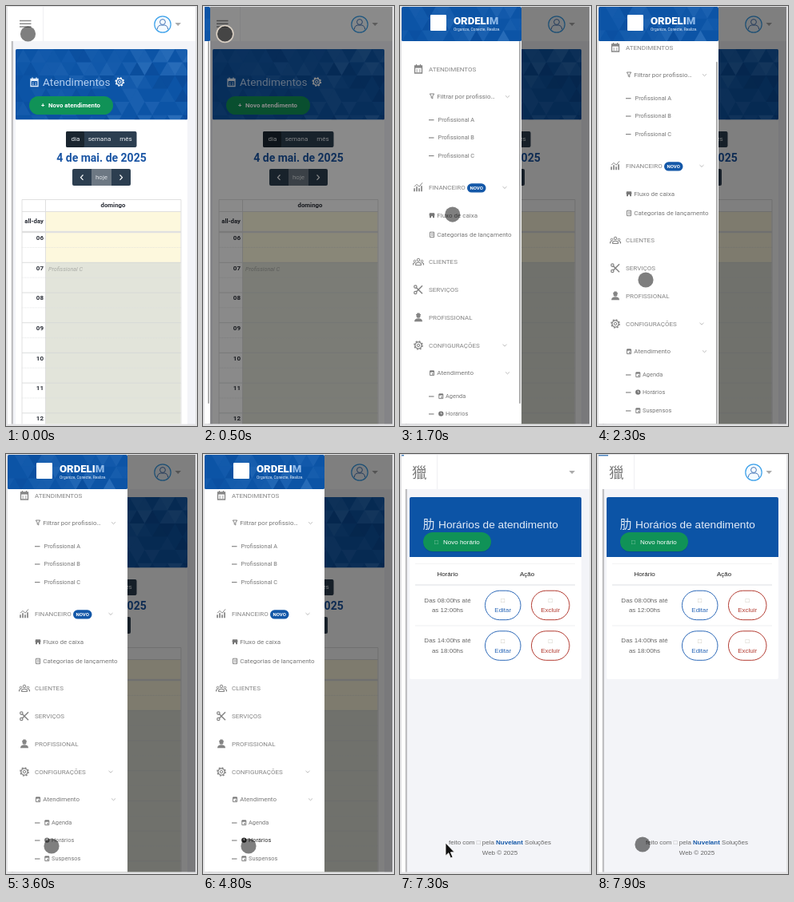
These frames come from a looping animation (239 by 526 pixels, 8 s). An HTML page:

```html
<!DOCTYPE html>
<html lang="pt-BR">
<head>
<meta charset="utf-8">
<title>Agenda</title>
<style>
html, body { margin: 0; width: 100%; height: 100%; overflow: hidden; background: #e3e3e5; }
svg { display: block; width: 239px; height: 526px; font-family: Roboto, "Open Sans", sans-serif; }
.plain { font-family: "Liberation Sans", "Noto Sans CJK SC", "Noto Sans CJK JP", sans-serif; }
</style>
</head>
<body>
<svg id="stage" viewBox="0 0 239 526" xmlns="http://www.w3.org/2000/svg"></svg>
<script>
const LOOP = 8000, STEP = 100;
const BLUE = '#0c54a6', NAVY = '#2c3e50', GREEN = '#109257', MUTED = '#858585';

const rect = (x, y, w, h, fill, more = '') =>
  `<rect x="${x}" y="${y}" width="${w}" height="${h}" fill="${fill}" ${more}/>`;
const text = (x, y, label, size, fill, more = '') =>
  `<text x="${x}" y="${y}" font-size="${size}" fill="${fill}" ${more}>${label}</text>`;
const line = (d, color, width = 1, more = '') =>
  `<path d="${d}" fill="none" stroke="${color}" stroke-width="${width}" ${more}/>`;
const shape = (d, fill, more = '') => `<path d="${d}" fill="${fill}" ${more}/>`;
const at = (x, y, body, scale = 1) => `<g transform="translate(${x} ${y}) scale(${scale})">${body}</g>`;
const MID = 'text-anchor="middle"', END = 'text-anchor="end"', BOLD = 'font-weight="700"', SEMI = 'font-weight="500"';

function random(seed) {
  return () => (seed = (seed * 16807) % 2147483647) / 2147483647;
}

// Mosaic of faint triangles, stronger towards the right.
function mosaic(x, y, w, h, size, seed, id) {
  const next = random(seed), tall = size * .87;
  let out = '';
  for (let row = 0; row * tall < h; row++) {
    for (let col = -1; col * size / 2 < w; col++) {
      const left = x + col * size / 2, top = y + row * tall;
      const up = (row + col) % 2 === 0, v = next(), strength = .35 + .65 * Math.max(0, col * size / 2 / w);
      if (v < .4) continue;
      const d = up ? `M${left} ${top + tall}h${size}l${-size / 2} ${-tall}z` : `M${left} ${top}h${size}l${-size / 2} ${tall}z`;
      out += shape(d, v < .55 ? '#002e70' : '#7db4f0', `opacity="${((v < .55 ? .2 : (v - .5) * .55) * strength).toFixed(3)}"`);
    }
  }
  return `<clipPath id="${id}">${rect(x, y, w, h, '#000', 'rx="1.5"')}</clipPath>
    <g clip-path="url(#${id})">${rect(x, y, w, h, BLUE)}${out}</g>`;
}

// Icons are drawn around their centre.
const icons = {
  calendar: c => line('M-4.5-4h9v9h-9zM-2.5-6v2M2.5-6v2', c, 1.3) + rect(-4.5, -4, 9, 2.6, c) +
    line('M-2.5 1h1.5M1 1h1.5M-2.5 3h1.5M1 3h1.5', c, 1.2),
  gear: c => `<circle r="4.1" fill="none" stroke="${c}" stroke-width="1.3"/><circle r="1.7" fill="none" stroke="${c}"/>` +
    `<circle r="5.1" fill="none" stroke="${c}" stroke-width="1.5" stroke-dasharray="2 2"/>`,
  chart: c => line('M-5 5V1M-2 5V-1M1 5V1M4 5V-2', c, 1.7) + line('M-5-1L-2-4L1-1L5-6', c, 1),
  people: c => [-4.5, 0, 4.5].map(x => `<circle cx="${x}" cy="${x ? -1 : -2.5}" r="${x ? 1.3 : 1.8}" fill="none" stroke="${c}"/>`).join('') +
    line('M-3.3 4v-2q3.3-2.5 6.6 0v2zM-6.5 4v-2l2-1M6.5 4v-2l-2-1', c, 1.1),
  scissors: c => line('M-3-3L5 5M-3 3L5-5', c, 1.5) +
    `<circle cx="-3.7" cy="-3.7" r="1.7" fill="none" stroke="${c}" stroke-width="1.2"/><circle cx="-3.7" cy="3.7" r="1.7" fill="none" stroke="${c}" stroke-width="1.2"/>`,
  person: c => `<circle cy="-2" r="2.5" fill="${c}"/>` + shape('M-5 5q0-4 5-4t5 4zM-3-3h6v-1.2h-1l-.5-1.6h-3l-.5 1.6h-1z', c),
  funnel: c => line('M-2.7-3h5.4L.8 0v3L-.8 2V0z', c, .9),
  store: c => shape('M-3-3H3L3.6 0H3V3H1V1H-1V3H-3V0H-3.6z', c),
  sheet: c => line('M-2.5-3h5v6.5h-5zM-1-1h2.5M-1 1h2.5', c, .9),
  clock: c => `<circle r="3.2" fill="${c}"/>` + line('M0-1.8V.3H1.5', '#fff', .7),
  small: c => line('M-2.5-2.5h5v5.5h-5z', c, .9) + rect(-2.5, -3, 5, 2, c) + rect(0, .5, 1.5, 1.5, c)
};
const icon = (name, x, y, color, scale) => at(x, y, icons[name](color), scale);
const chevron = (x, y) => line(`M${x - 2.5} ${y - 1.2}l2.5 2.4l2.5-2.4`, '#b5b5b5', .9);

const avatar = `<circle cx="196" cy="23" r="10.2" fill="#f4faff" stroke="#3aa0ea" stroke-width="1.2"/>
  <circle cx="196" cy="20" r="3.4" fill="none" stroke="#4a78b8"/>` +
  line('M189.3 29.3q.4-5 4.5-5.3h4.4q4.1.3 4.5 5.3', '#4a78b8');

function frame(withAvatar) {
  return rect(2, 1, 235, 523, '#f3f4f8') + rect(2, 44, 5, 480, '#fff') + rect(6.7, 44, 2.2, 480, '#bdbdc0') +
    rect(2, 1, 235, 43, '#fff') + rect(46, 1, .8, 43, '#ececf0') +
    `<g id="${withAvatar}">${avatar}</g>` + shape('M211.5 21h7.5l-3.75 4z', '#aaa');
}

function agenda() {
  let out = frame('avatarA') + line('M17 18.5h14.5M17 22.2h14.5M17 26h14.5', '#8a8a8a', 1.4) +
    rect(12, 54, 215, 470, '#fff') + mosaic(12, 54, 215, 88.5, 19, 4127, 'bannerClip') +
    icon('calendar', 35.5, 95.5, '#e4eefa') + text(46, 100, 'Atendimentos', 13.6, '#b4cff0') +
    icon('gear', 142.3, 95, '#fff') +
    rect(29, 113, 105, 23, GREEN, 'rx="11.5"') +
    text(44, 127.2, '+', 8, '#fff', BOLD) + text(53, 127.2, 'Novo atendimento', 7.9, '#fff', BOLD) +
    rect(75, 157, 88.5, 20, NAVY, 'rx="2"') + rect(75, 157, 23, 20, '#1a252f', 'rx="2"');
  [['dia', 87], ['semana', 117], ['mês', 150]].forEach(([s, x]) => out += text(x, 169.4, s, 8, '#e8ecf0', MID));
  out += text(119.5, 195, '4 de mai. de 2025', 14, '#1a55a4', MID + BOLD.padStart(20)) +
    rect(83, 204, 73, 21, NAVY, 'rx="2"') + rect(107, 204, 25, 21, '#6d7883') +
    text(119.5, 217, 'hoje', 8, '#dfe3e7', MID) +
    line('M96.5 211.5l-3 3.2l3 3.2M142.5 211.5l3 3.2l-3 3.2', '#fff', 1.2) +
    rect(49.5, 257.5, 169, 64, '#fdf8dd') + rect(49.5, 321, 169, 203, '#e2e4da') +
    rect(20, 281.8, 199, 2.4, '#e0e0e0') +
    text(134, 252, 'domingo', 7.8, '#2b2f38', MID + ' ' + BOLD) +
    text(47, 271.8, 'all-day', 7.8, '#2b2f38', END + ' ' + BOLD);
  for (let i = 0; i < 7; i++) {
    const y = 283.6 + i * 37.7;
    if (i) out += line(`M20 ${y}H219`, '#d3d6d6', .8);
    out += line(`M20 ${y + 18.85}H219`, '#d9dcdd', .7, 'stroke-dasharray="1 1"') +
      text(47, y + 9.3, String(i + 6).padStart(2, '0'), 8, '#2b2f38', END + ' ' + BOLD);
  }
  return out + line('M20 524V242.5H219V524M49.5 242.5V524M20 257.5H219', '#dddddd', .9) +
    text(53, 332, 'Profissional C', 7.2, '#aaaca6', 'font-style="italic"');
}

function menu() {
  const head = (y, label, name) => icon(name, 23, y, MUTED) + text(36, y + 2.9, label, 8, MUTED);
  const sub = (y, label, name) => icon(name, 40, y, '#777') + text(46.3, y + 2.8, label, 8, '#777');
  const dash = y => rect(36, y - .2, 6.5, 1.2, '#888');
  const leaf = (y, label) => dash(y) + text(47.5, y + 2.6, label, 7.4, '#777');
  const deep = (y, label, name, id = '') =>
    dash(y) + `<g id="${id}" fill="#777">` + icon(name, 51.3, y, '#777') + text(57, y + 2.6, label, 7.4, '#777') + '</g>';
  const items = head(79, 'ATENDIMENTOS', 'calendar') + sub(113, 'Filtrar por profissio…', 'funnel') + chevron(134.5, 113.5) +
    leaf(142.3, 'Profissional A') + leaf(164.6, 'Profissional B') + leaf(187.2, 'Profissional C') +
    head(227.3, 'FINANCEIRO', 'chart') + rect(84, 222.3, 23.5, 11.3, '#1458a8', 'rx="5.6"') +
    text(95.7, 230.2, 'NOVO', 6, '#fff', MID + ' ' + BOLD) + chevron(131, 227.3) +
    sub(262.3, 'Fluxo de caixa', 'store') + sub(286.2, 'Categorias de lançamento', 'sheet') +
    head(320.5, 'CLIENTES', 'people') + head(355.3, 'SERVIÇOS', 'scissors') + head(390.3, 'PROFISSIONAL', 'person') +
    head(425, 'CONFIGURAÇÕES', 'gear') + chevron(131, 425) +
    sub(459.6, 'Atendimento', 'small') + chevron(134.5, 459.6) +
    deep(488.6, 'Agenda', 'small', 'agendaItem') + deep(510.6, 'Horários', 'clock', 'hoursItem') +
    deep(533.6, 'Suspensos', 'small', 'heldItem');
  return rect(2, 1, 150, 523, '#fff') +
    `<clipPath id="menuClip">${rect(2, 44, 150, 480, '#000')}</clipPath>
     <g clip-path="url(#menuClip)"><g id="items">${items}</g></g>` +
    rect(149, 44, 2, 454, '#b0b0b0', 'id="thumb" rx="1"') +
    mosaic(2, 1, 150, 43, 17, 913, 'headClip') + rect(38, 11, 20, 20, '#fff', 'rx="1"') +
    `<text x="67" y="23" font-size="13.2" font-weight="900" fill="#fff">ORDELI<tspan fill="#8fb9e8">M</tspan></text>` +
    text(67, 30.8, 'Organize, Conecte, Realize.', 4.9, '#e3edf8');
}

function hours() {
  const pill = (x, w, y, color, label) => rect(x, y, w, 36.5, '#fff', `rx="18.2" stroke="${color}"`) +
    text(x + w / 2, y + 15, '□', 8, '#b9b4a4', MID) + text(x + w / 2, y + 27, label, 8, color, MID);
  const row = (y, from, to) => text(59.5, y + 14.6, from, 8, '#666', MID) + text(59.5, y + 26.7, to, 8, '#666', MID) +
    pill(106.5, 44.5, y, '#2b68b8', 'Editar') + pill(164.5, 47.5, y, '#b33a30', 'Excluir');
  return frame('avatarB') + text(15, 29.5, '獵', 18.5, '#777') + rect(2, 1, 12, 1.5, '#4a82bd', 'id="progress"') +
    rect(12, 54, 215, 228, '#fff', 'rx="2"') + shape('M12 129V56q0-2 2-2H225q2 0 2 2V129z', BLUE) +
    text(28.7, 93.3, '肋', 14.5, '#e9f0fa') + text(48, 93, 'Horários de atendimento', 13.7, '#e3ecf8') +
    rect(29, 99, 85, 24, '#05386f', 'rx="12" opacity=".35"') + rect(29, 98, 85, 24, GREEN, 'rx="12"') +
    text(43, 112.5, '□', 8, '#9fd6ba') + text(54, 112.6, 'Novo horário', 8, '#fff') +
    line('M19 137.5H219', '#f0f0f2', .8) + line('M19 164H219', '#dcdfe3', 1.2) + line('M19 215H219', '#eceef0', .9) +
    text(59.5, 153, 'Horário', 8, '#222', MID) + text(159, 153, 'Ação', 8, '#222', MID) +
    row(171.2, 'Das 08:00hs até', 'as 12:00hs') + row(221.8, 'Das 14:00hs até', 'as 18:00hs') +
    `<text x="125" y="489" font-size="8" fill="#666" ${MID}>feito com <tspan fill="#aaa">□</tspan> pela <tspan fill="#1458a8" ${BOLD}>Nuvelant</tspan> Soluções</text>` +
    text(125, 502, 'Web © 2025', 8, '#666', MID);
}

const stage = document.getElementById('stage');
stage.innerHTML = `<clipPath id="screen">${rect(2, 1, 235, 522.5, '#000')}</clipPath>
  <rect width="239" height="526" fill="#e3e3e5"/>
  <g clip-path="url(#screen)">
    <g id="agenda">${agenda()}</g>
    ${rect(2, 1, 235, 523, '#000', 'id="shade"')}
    <g id="menu">${menu()}</g>
    <g id="hours" class="plain">${hours()}</g>
  </g>
  <g id="touch"><circle r="9.6" opacity=".5"/><circle id="ring" r="10.4" fill="none" stroke="#d9cfc2" stroke-width="1.5"/></g>
  <path id="arrow" d="M0 0V16.2L3.8 12.7L6.4 19L9 17.9L6.4 11.8H11.2Z" fill="#111" stroke="#fff" stroke-width=".8"/>`;

const $ = id => document.getElementById(id);
const show = (id, on) => $(id).setAttribute('display', on ? 'inline' : 'none');
const move = (id, x, y) => $(id).setAttribute('transform', `translate(${x} ${y})`);
const ease = k => k * k * (3 - 2 * k);

// Each leg: first changed moment, number of steps, destination.
const legs = [[900, 3, 76, 84], [1300, 8, 61, 343], [2600, 8, 62, 494], [3600, 1, 57, 491], [6100, 1, 57, 489]];

function pointer(t) {
  let x = 27.5, y = 35;
  for (const [start, steps, toX, toY] of legs) {
    if (t < start) break;
    const k = ease(Math.min(1, ((t - start) / STEP + 1) / steps));
    x += (toX - x) * k;
    y += (toY - y) * k;
  }
  return [x, y];
}

function draw(t) {
  const open = t >= 500, loaded = t >= 7300;
  const slide = t < 600 ? -143 : t < 700 ? -50 : 0;
  const scroll = t >= 2300 ? 27 : 0;
  show('agenda', !loaded);
  show('shade', open && !loaded);
  show('menu', open && !loaded);
  show('hours', loaded);
  $('shade').setAttribute('opacity', t < 600 ? .46 : .5);
  move('menu', slide, 0);
  move('items', 0, -scroll);
  move('thumb', 0, scroll * .95);
  $('thumb').setAttribute('opacity', t < 2600 ? 1 : Math.max(0, 1 - (t - 2500) / 800));
  $('hoursItem').querySelector('text').setAttribute('fill', t >= 4200 ? '#2d2d2d' : '#777');
  $('hoursItem').querySelector('circle').setAttribute('fill', t >= 4200 ? '#2d2d2d' : '#777');
  show('avatarB', t >= 7900);
  $('progress').setAttribute('width', t < 7500 ? 3 : t < 7900 ? 7 : 12);

  const [x, y] = pointer(t);
  const arrow = (t >= 4200 && t < 4800) || (t >= 6700 && t < 7500);
  show('touch', !arrow);
  show('arrow', arrow);
  show('ring', t >= 500 && t < 700);
  move('touch', x, y);
  move('arrow', x, y - 2);
}

function tick() {
  draw(Math.floor(performance.now() % LOOP / STEP) * STEP);
  requestAnimationFrame(tick);
}
tick();
</script>
</body>
</html>
```
